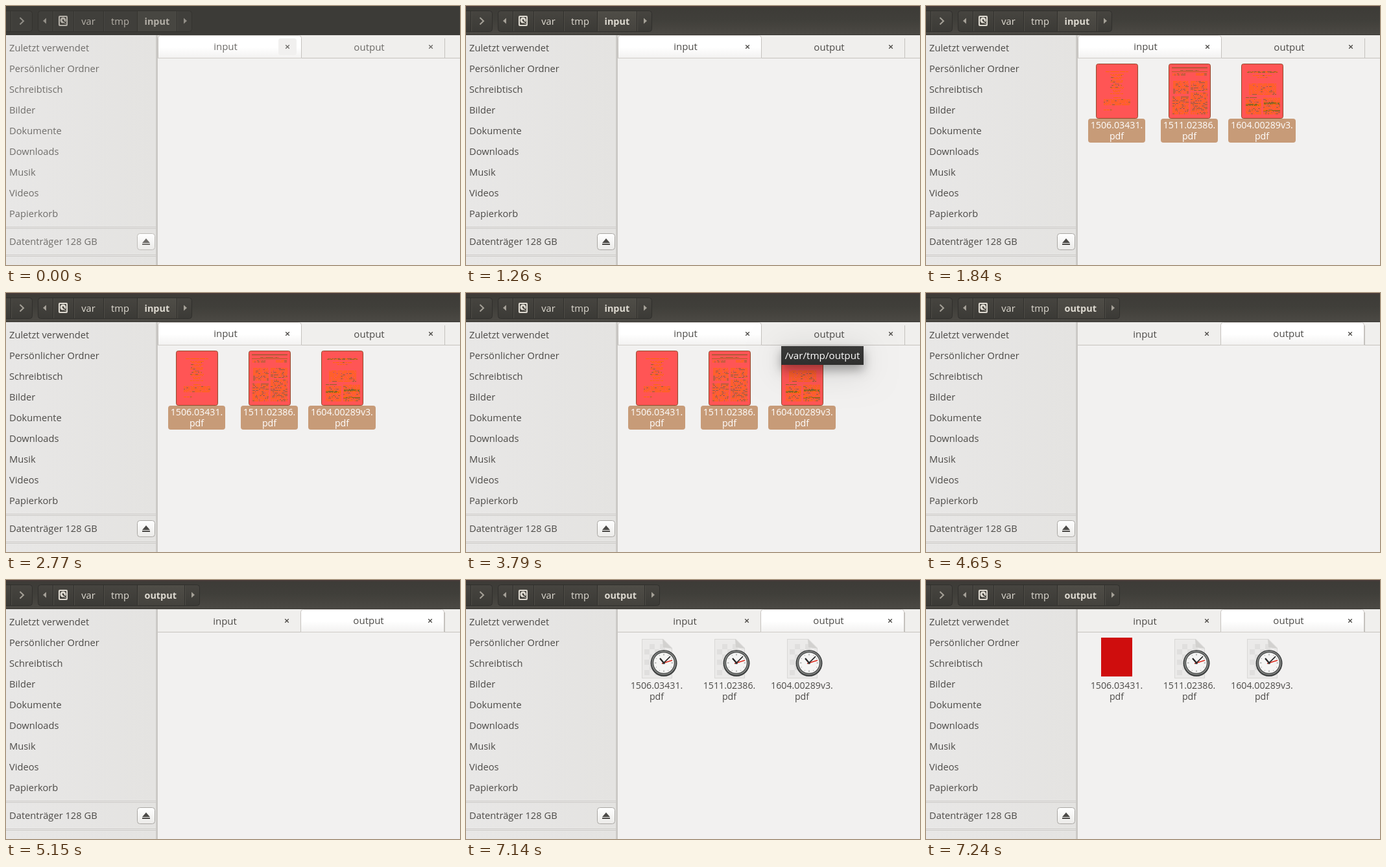
These frames come from a looping animation (700x400 px, 8 s). An HTML page with a canvas:

```html
<!DOCTYPE html>
<html lang="de">
<head>
<meta charset="utf-8">
<title>Dateien</title>
<style>
html, body { margin: 0; width: 100%; height: 100%; overflow: hidden; background: #f2f1f0; }
canvas { display: block; }
</style>
</head>
<body>
<canvas id="stage" width="700" height="400"></canvas>
<script>
const ctx = document.getElementById('stage').getContext('2d');
const LOOP = 8000;
const FONT = '"Open Sans", "Noto Sans", sans-serif';
const PLACES = ['Zuletzt verwendet', 'Persönlicher Ordner', 'Schreibtisch', 'Bilder',
  'Dokumente', 'Downloads', 'Musik', 'Videos', 'Papierkorb'];
const FILES = [
  { name: '1506.03431.', x: 294, w: 88 },
  { name: '1511.02386.', x: 406, w: 88 },
  { name: '1604.00289v3.', x: 518, w: 104 }
];

function rect(x, y, w, h, fill) {
  ctx.fillStyle = fill;
  ctx.fillRect(x, y, w, h);
}

function box(x, y, w, h, r, fill, stroke) {
  ctx.beginPath();
  ctx.roundRect(x, y, w, h, r);
  if (fill) { ctx.fillStyle = fill; ctx.fill(); }
  if (stroke) { ctx.strokeStyle = stroke; ctx.lineWidth = 1; ctx.stroke(); }
}

function poly(points, fill) {
  ctx.beginPath();
  points.forEach(([x, y]) => ctx.lineTo(x, y));
  ctx.closePath();
  ctx.fillStyle = fill;
  ctx.fill();
}

function line(x1, y1, x2, y2, color, width) {
  ctx.beginPath();
  ctx.moveTo(x1, y1);
  ctx.lineTo(x2, y2);
  ctx.strokeStyle = color;
  ctx.lineWidth = width;
  ctx.stroke();
}

function disc(x, y, r, fill) {
  ctx.beginPath();
  ctx.arc(x, y, r, 0, Math.PI * 2);
  ctx.fillStyle = fill;
  ctx.fill();
}

function fade(y1, y2, ...colors) {
  const g = ctx.createLinearGradient(0, y1, 0, y2);
  colors.forEach((c, i) => g.addColorStop(i / (colors.length - 1), c));
  return g;
}

function text(str, x, y, color, size = 14.7, align = 'left', weight = 400) {
  ctx.font = `${weight} ${size}px ${FONT}`;
  ctx.textAlign = align;
  ctx.fillStyle = color;
  ctx.fillText(str, x, y);
}

function random(seed) {
  return () => (seed = (seed * 16807) % 2147483647) / 2147483647;
}

function drawHeader(s) {
  const ink = s.active ? '#dfdbd2' : '#b4b0a8';
  const dim = s.active ? '#a5a198' : '#918e87';
  const edge = '#302f2c';
  const end = s.tab ? 299 : 287;
  const last = s.tab ? 275 : 263;
  rect(0, 0, 700, 45, s.active ? fade(0, 44, '#3d3b37', '#403f3a', '#4b4944') : '#3c3b37');
  if (s.active) rect(0, 0, 700, 2, '#463a38');
  rect(0, 44, 700, 1, s.active ? '#35332f' : '#393834');

  const face = s.active ? fade(7, 40, '#474540', '#3b3a36') : '#403f3b';
  const rim = s.active ? edge : '#34332f';
  box(-8.5, 7.5, 49, 32, 4, face, rim);
  box(49.5, 7.5, end - 50, 32, 4, face, rim);
  rect(203, 8, last - 203, 31, s.active ? fade(8, 39, '#4f4d47', '#45433e') : '#474641');
  [7, 72, 104, 150, 202, last].forEach(x => {
    rect(x, 8, 1, 31, rim);
    rect(x + 1, 8, 1, 31, s.active ? '#504e48' : '#494843');
  });

  ctx.beginPath();
  ctx.moveTo(21.5, 18);
  ctx.lineTo(27, 23.2);
  ctx.lineTo(21.5, 28.5);
  ctx.strokeStyle = dim;
  ctx.lineWidth = 2;
  ctx.stroke();
  poly([[62, 18.5], [62, 27.5], [57, 23]], dim);
  poly([[last + 11, 18.5], [last + 11, 27.5], [last + 16, 23]], dim);

  box(81, 15, 14, 16, 2, ink);
  box(83, 17, 10, 12, 1, '#43413c');
  disc(88, 22, 4.5, ink);
  disc(88, 22, 1.4, '#43413c');
  line(88, 22, 92.5, 28, '#43413c', 2);
  line(89.5, 25, 92, 28, ink, 1);

  text('var', 127, 29, ink, 14.7, 'center');
  text('tmp', 176, 29, ink, 14.7, 'center');
  text(s.tab ? 'output' : 'input', 213.5, 29, ink, 14.4, 'left', 700);
}

function drawSidebar(s) {
  const ink = s.active ? '#4c4a47' : '#706e6b';
  const g = ctx.createLinearGradient(0, 0, 231, 0);
  g.addColorStop(0, '#e8e7e6');
  g.addColorStop(1, '#e4e3e1');
  rect(0, 45, 231, 355, g);
  rect(231, 45, 1, 355, '#cfcdca');
  rect(232, 45, 2, 355, '#c9c7c4');
  PLACES.forEach((p, i) => text(p, 5, 70 + i * 32, ink));
  [341, 384].forEach(y => {
    rect(0, y, 231, 1, '#c9c7c4');
    rect(0, y + 1, 231, 1, '#f0efee');
    rect(0, y + 2, 231, 1, '#c9c7c4');
  });
  text('Datenträger 128 GB', 5, 369, ink);
  box(202.5, 351.5, 27, 25, 4, fade(351, 377, '#ffffff', '#ebeae8'),
    s.active ? '#a9a7a3' : '#bebcb8');
  poly([[210, 366], [216, 359], [222, 366]], ink);
  rect(210, 367, 12, 2, ink);
}

function drawTabs(s) {
  const ink = s.active ? '#4c4a47' : '#6c6a67';
  const edge = '#c5c2be';
  rect(234, 45, 466, 36, '#f0efed');
  rect(234, 45, 466, 1, '#e2e0dd');
  rect(676, 50, 1, 30, edge);
  rect(234, 80, 466, 1, edge);
  const x = s.tab ? 454 : 234;
  box(x + .5, 45.5, 221, 39, 4, fade(46, 81, '#ffffff', '#ffffff', '#f2f1f0'), edge);
  rect(234, 81, 466, 5, '#f2f1f0');
  rect(x, 80, 222, 1, '#cfccc8');
  if (!s.active) box(420, 50, 28, 26, 4, '#f1f0ef');
  const shift = s.tab ? -1 : 0;
  ['input', 'output'].forEach((label, i) => {
    const low = i === s.tab ? 0 : 1;
    text(label, 338.5 + i * 221.5 + shift, 68 + low, ink, 15, 'center');
    const cx = 434 + i * 221 + shift, cy = 63;
    line(cx - 2.8, cy - 2.8, cx + 2.8, cy + 2.8, ink, 1.3);
    line(cx - 2.8, cy + 2.8, cx + 2.8, cy - 2.8, ink, 1.3);
  });
}

// Rows of tiny dashes that read as shrunken print.
function print(rnd, x, y, w, h, step, dark) {
  for (let row = y; row < y + h; row += step) {
    let at = x;
    while (at < x + w) {
      const len = Math.min(1 + Math.floor(rnd() * 4), x + w - at);
      rect(at, row, len, 1, rnd() < dark ? '#8d6426' : '#ff6a00');
      at += len + (rnd() < .45 ? 1 : 0);
    }
  }
}

function drawThumb(i) {
  const x = FILES[i].x - 32, y = 89;
  const rnd = random(71 + i * 40);
  const put = (dx, dy, w, h, step, dark) => print(rnd, x + dx, y + dy, w, h, step, dark);
  box(x + .5, y + .5, 64, 84, 3, '#ff5555', '#8f4a2c');
  if (i === 0) {
    put(15, 12, 35, 1, 2, .1);
    for (let k = 0; k < 13; k++) {
      const w = 10 + Math.floor(rnd() * 12);
      put(32 - (w >> 1), 16 + k * 2.5 | 0, w, 1, 2, .15);
    }
    put(27, 52, 11, 1, 2, .2);
    put(12, 55, 41, 9, 2, .08);
    put(12, 71, 13, 2, 2, .1);
  } else if (i === 1) {
    rect(x + 5, y + 6, 55, 1, '#7a5a24');
    put(18, 10, 29, 1, 2, .9);
    rect(x + 5, y + 12, 55, 1, '#b06022');
    put(6, 15, 20, 4, 2, .5);
    put(42, 15, 17, 4, 2, .4);
    put(7, 27, 24, 20, 2, .3);
    put(34, 27, 26, 15, 2, .35);
    put(6, 51, 25, 27, 2, .35);
    put(34, 45, 26, 33, 2, .4);
  } else {
    put(9, 12, 47, 2, 1, .65);
    put(18, 18, 29, 1, 2, .1);
    put(25, 21, 15, 1, 2, .1);
    put(12, 31, 42, 17, 2, .12);
    put(7, 52, 17, 1, 2, .7);
    put(7, 55, 24, 24, 2, .15);
    put(34, 53, 26, 25, 2, .2);
    put(7, 62, 23, 3, 1, .8);
    put(35, 60, 24, 3, 1, .8);
    put(34, 72, 26, 2, 1, .75);
  }
}

function drawLabel(file, y, color) {
  text(file.name, file.x, y, color, 14.2, 'center');
  text('pdf', file.x, y + 17, color, 14.2, 'center');
}

function drawSelected() {
  FILES.forEach((f, i) => {
    drawThumb(i);
    box(f.x - f.w / 2, 174, f.w, 37, 4, '#c79b78');
    drawLabel(f, 189, '#ffffff');
  });
}

function drawPending(cx) {
  const x = cx - 23;
  poly([[x, 91], [x + 33, 91], [x + 47, 105], [x + 47, 152], [x, 152]], '#d9d8d6');
  poly([[x + 1, 92], [x + 33, 92], [x + 46, 105], [x + 46, 151], [x + 1, 151]], '#ebeae9');
  for (let r = 0; r < 6; r++) {
    for (let c = 0; c < 4; c++) {
      if ((r + c) % 2) rect(x + 4 + c * 8, 99 + r * 8, 8, 8, '#e0dfde');
    }
  }
  poly([[x + 32, 91], [x + 47, 106], [x + 33, 104]], '#d2d1cf');
  const px = cx + 11, py = 128;
  disc(px, py + .5, 20.5, '#3e4040');
  disc(px, py, 18.7, '#8b8d8b');
  disc(px, py, 17.2, '#4d4f4e');
  disc(px, py, 15.8, '#f5f5f4');
  for (let k = 0; k < 12; k++) {
    const a = k * Math.PI / 6, c = Math.cos(a), s = Math.sin(a);
    const r = k % 3 ? 13 : 11.5;
    line(px + c * r, py + s * r, px + c * 14, py + s * 14, '#888a88', 1);
  }
  line(px, py, px - 6, py - 7, '#222', 2.2);
  line(px, py, px + 10, py - 10, '#222', 1.7);
  line(px - 3, py + 1, px + 13, py - 4, '#dc2a1c', 1.5);
  disc(px, py, 2, '#333');
}

function drawOutput(ready) {
  FILES.forEach((f, i) => {
    if (i === 0 && ready) rect(270, 89, 48, 60, '#cf0d0d');
    else drawPending(f.x);
    drawLabel(f, 168, '#4c4a47');
  });
}

function drawTip(x) {
  ctx.save();
  ctx.shadowOffsetY = 8;
  [[50, .16], [16, .32]].forEach(([blur, alpha]) => {
    ctx.shadowBlur = blur;
    ctx.shadowColor = `rgba(0,0,0,${alpha})`;
    rect(x, 82, 127, 29, '#343434');
  });
  ctx.restore();
  rect(x, 82, 127, 29, fade(82, 111, '#3a3a39', '#2f2f2e'));
  text('/var/tmp/output', x + 63.5, 102, '#ffffff', 15.2, 'center');
}

function draw(t) {
  const s = { active: t >= 1260, tab: t >= 4610 ? 1 : 0 };
  rect(0, 0, 700, 400, '#f2f1f0');
  drawHeader(s);
  drawSidebar(s);
  drawTabs(s);
  if (t >= 1840 && t < 4610) drawSelected();
  if (t >= 7140) drawOutput(t >= 7240);
  if (t >= 3790 && t < 4610) drawTip(486);
  if (t >= 4690 && t < 5150) drawTip(485);
}

const start = performance.now();
function tick() {
  draw((performance.now() - start) % LOOP);
  requestAnimationFrame(tick);
}
tick();
</script>
</body>
</html>
```
